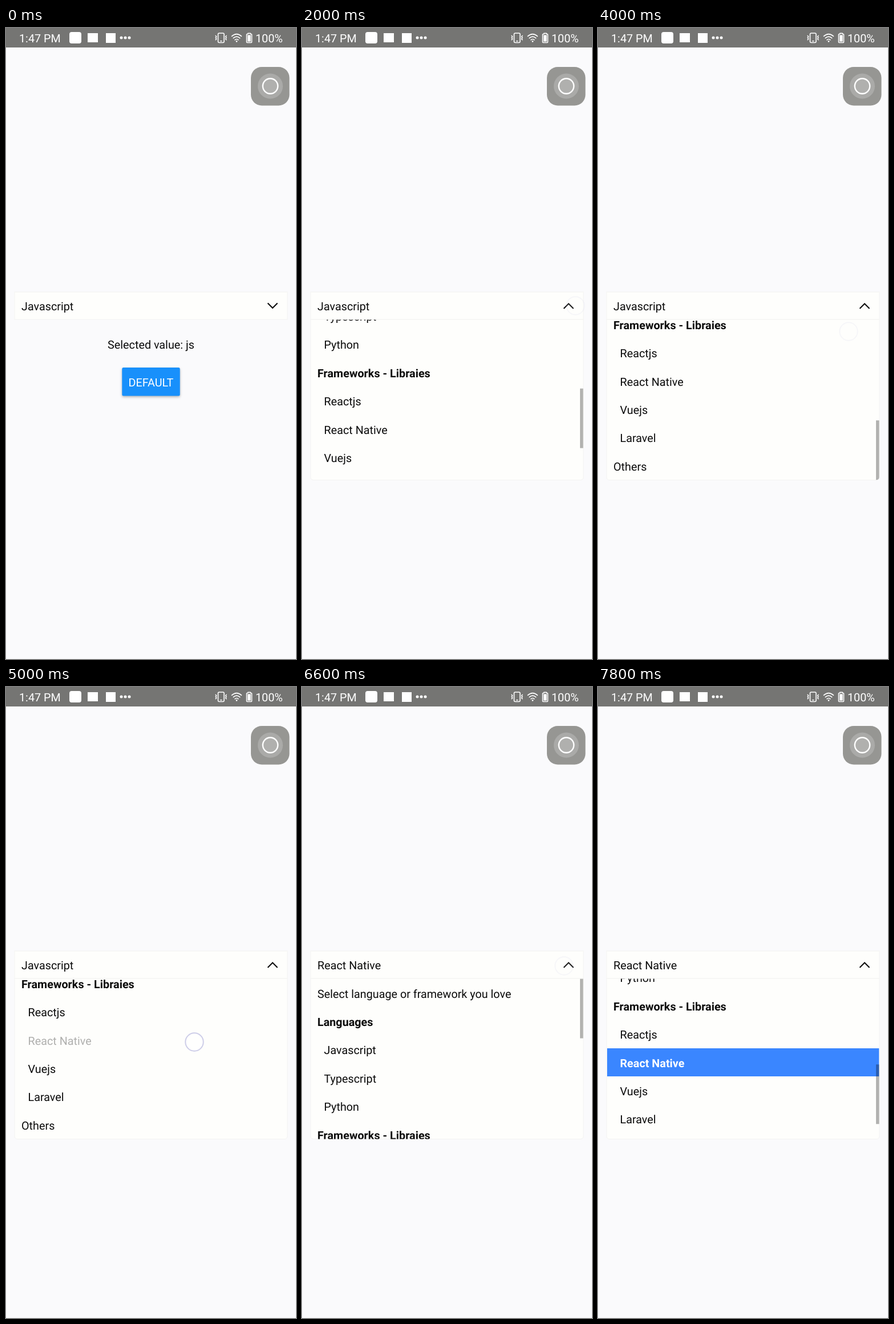
An HTML page that plays this animation: 508 px wide and 1102 px high, repeating every 8 s.

```html
<!DOCTYPE html>
<html lang="en">
<head>
<meta charset="utf-8">
<title>Select box</title>
<style>
  html, body { margin: 0; width: 100%; height: 100%; overflow: hidden; background: #fafafc; }
  svg { display: block; width: 508px; height: 1102px; }
  text { font: 19.77px Roboto, sans-serif; fill: #0b0b0b; white-space: pre; text-rendering: geometricPrecision; }
  .status text { fill: #fff; }
  .bold { font-weight: 700; }
  .row.selected text { fill: #fff; font-weight: 700; }
  .row rect { fill: none; }
  .row.selected rect { fill: #3a86ff; }
  .row.pressed text { opacity: .32; }
  .line { fill: none; stroke: #fff; stroke-width: 1.6; stroke-linecap: round; }
  .box { fill: #fefefc; stroke: #f3f3f1; }
  .button { fill: #1890fb; filter: drop-shadow(0 2px 2px rgba(0, 0, 0, .28)); }
</style>
</head>
<body>
<svg viewBox="0 0 508 1102">
  <defs>
    <clipPath id="panelClip">
      <path d="M15.5 509.5H492.5V784.5a5 5 0 0 1-5 5H20.5a5 5 0 0 1-5-5Z"/>
    </clipPath>
  </defs>
  <rect width="508" height="1102" fill="#fafafc"/>

  <g class="status">
    <rect width="508" height="34" fill="#757573"/>
    <text x="23" y="24.5">1:47 PM</text>
    <g fill="#fff">
      <rect x="111" y="7" width="21" height="20" rx="4"/>
      <rect x="143" y="9" width="18" height="16"/>
      <rect x="175" y="9" width="17" height="17"/>
      <circle cx="202" cy="17" r="2.5"/>
      <circle cx="209" cy="17" r="2.5"/>
      <circle cx="216" cy="17" r="2.5"/>
    </g>
    <rect class="line" x="371.5" y="9" width="10.5" height="16.5" rx="2"/>
    <path class="line" d="M375.8 22.7h2M367.3 13.5l1.3 1.8-1.3 1.8 1.3 1.8-1.3 1.8M386 13.5l-1.3 1.8 1.3 1.8-1.3 1.8 1.3 1.8"/>
    <path class="line" d="M395.5 14.3q8.5-7.5 17 0M398.3 17.6q5.7-5 11.4 0M401 20.8q3-2.6 6 0"/>
    <circle cx="404" cy="23.4" r="1.3" fill="#fff"/>
    <path class="line" d="M421.5 11.5q0-1 1-1h1.5v-1.3h4v1.3h1.5q1 0 1 1v13q0 1-1 1h-7q-1 0-1-1Z"/>
    <rect x="423.3" y="12.3" width="5.4" height="11.4" fill="#fff"/>
    <text x="437" y="24.5">100%</text>
  </g>

  <rect x="429" y="68" width="67.5" height="67.5" rx="19" fill="#969693"/>
  <circle cx="463" cy="101.5" r="22" fill="#aaaaa8"/>
  <circle cx="463" cy="101.5" r="13.2" fill="#b0b0ae" stroke="#fff" stroke-width="2.4"/>

  <g id="result">
    <text id="value" x="254" y="559.6" text-anchor="middle"></text>
    <rect class="button" x="203.3" y="593" width="101.4" height="49.4" rx="2.5"/>
    <text x="254" y="625.7" text-anchor="middle" style="fill:#fff">DEFAULT</text>
  </g>

  <rect class="box" x="15" y="461" width="478" height="48"/>
  <text id="label" x="27" y="492.8"></text>
  <path id="chevron" d="M458.5 480.5L467 489L475.5 480.5" fill="none" stroke="#0b0b0b" stroke-width="2.1"/>

  <g id="panel">
    <path class="box" d="M15 509H493V784.5a5 5 0 0 1-5 5H20a5 5 0 0 1-5-5Z"/>
    <g clip-path="url(#panelClip)">
      <g id="rows"></g>
      <rect id="thumb" x="487" y="509.5" width="6" height="104" fill="#000" opacity=".3"/>
    </g>
  </g>

  <circle id="touch" r="15.7" fill="#fff" fill-opacity=".5" stroke="#cdcde8" stroke-width="2"/>
</svg>

<script>
const LOOP = 8000, STEP = 200;
const ROW = 49.43, TOP = 510, MAX_SCROLL = 263.7, THUMB_TRAVEL = 175.8;

// Leading # marks a heading, leading - an indented item.
const OPTIONS = [
  'Select language or framework you love',
  '#Languages', '-Javascript', '-Typescript', '-Python',
  '#Frameworks - Libraies', '-Reactjs', '-React Native', '-Vuejs', '-Laravel',
  'Others'
];
const JAVASCRIPT = 2, PYTHON = 4, REACT_NATIVE = 7;

const el = id => document.getElementById(id);
const within = (t, from, to) => t >= from && t < to;
const name = i => OPTIONS[i].replace(/^[#-]/, '');

// Distance scrolled by a flick, slowing down exponentially.
const fling = (distance, elapsed) => distance * (1 - .5575 ** (elapsed / 200));
// How far the list is dragged back from its end while the finger moves to and fro.
const pullBack = t => 70 * Math.abs(Math.sin(Math.PI * (t - 3000) / 1000));

const tap = (x, y) => () => [x, y];
const swipe = (x0, y0, x1, y1) => k => {
  const eased = 1 - (1 - k) ** 2;
  return [x0 + (x1 - x0) * eased, y0 + (y1 - y0) * eased];
};
const wobble = (k, t) => [432 + 7 * (t - 3000) / 1000, 552 - 22 * (t - 3000) / 1000 + pullBack(t)];

const GESTURES = [
  { down: 400, up: 800, at: tap(462, 474) },
  { down: 1400, up: 1800, at: swipe(455, 700, 479, 485) },
  { down: 2600, up: 4000, at: wobble },
  { down: 4800, up: 5200, at: tap(330, 620) },
  { down: 6000, up: 6400, at: tap(459, 487) },
  { down: 7000, up: 7400, at: swipe(387, 725, 417, 538) }
];
const AFTERGLOW = 400;

function scrollAt(t) {
  if (t < 1400 || within(t, 5400, 7000)) return 0;
  if (t < 2600) return fling(218, Math.min(t, 2200) - 1400);
  if (t < 4000) return MAX_SCROLL - pullBack(t);
  if (t < 5400) return MAX_SCROLL;
  return fling(248.6, t - 7000);
}

el('rows').innerHTML = OPTIONS.map((option, i) => {
  const y = TOP + i * ROW;
  const top = Math.round(y), height = Math.round(y + ROW) - top;
  return `<g class="row"><rect x="16" y="${top}" width="476.5" height="${height}"/>` +
    `<text class="${option[0] === '#' ? 'bold' : ''}" x="${option[0] === '-' ? 38.5 : 27}" ` +
    `y="${Math.round(y + ROW / 2 + 7.8)}">${name(i)}</text></g>`;
}).join('');
const rows = [...el('rows').children];

function drawTouch(t) {
  const gesture = GESTURES.find(g => within(t, g.down, g.up + AFTERGLOW));
  el('touch').style.display = gesture ? '' : 'none';
  if (!gesture) return;
  const { down, up, at } = gesture;
  const end = Math.min(t, up);
  const [x, y] = at((end - down) / (up - down), end);
  el('touch').setAttribute('transform', `translate(${x} ${y})`);
  el('touch').setAttribute('opacity', t < up ? 1 : .15);
}

function draw(t) {
  const open = within(t, 800, 5400) || t >= 6400;
  const native = t >= 5200;
  const selected = native ? REACT_NATIVE : JAVASCRIPT;
  const pressed = within(t, 5000, 5200) ? REACT_NATIVE : within(t, 7200, 7400) ? PYTHON : -1;
  const scroll = scrollAt(t);

  el('label').textContent = name(selected);
  el('value').textContent = 'Selected value: ' + (native ? 'react-native' : 'js');
  el('chevron').setAttribute('transform', `rotate(${open ? 180 : 0} 467 485.25)`);
  el('panel').style.display = open ? '' : 'none';
  el('result').style.display = open ? 'none' : '';

  rows.forEach((row, i) => {
    row.classList.toggle('selected', i === selected);
    row.classList.toggle('pressed', i === pressed);
  });
  el('rows').setAttribute('transform', `translate(0 ${-Math.round(scroll)})`);
  el('thumb').setAttribute('transform', `translate(0 ${scroll / MAX_SCROLL * THUMB_TRAVEL})`);
  el('thumb').style.display = within(t, 4400, 5400) ? 'none' : '';
  drawTouch(t);
}

const start = performance.now();
function tick() {
  const t = (performance.now() - start) % LOOP;
  draw(Math.floor(t / STEP) * STEP);
  requestAnimationFrame(tick);
}
tick();
</script>
</body>
</html>
```
